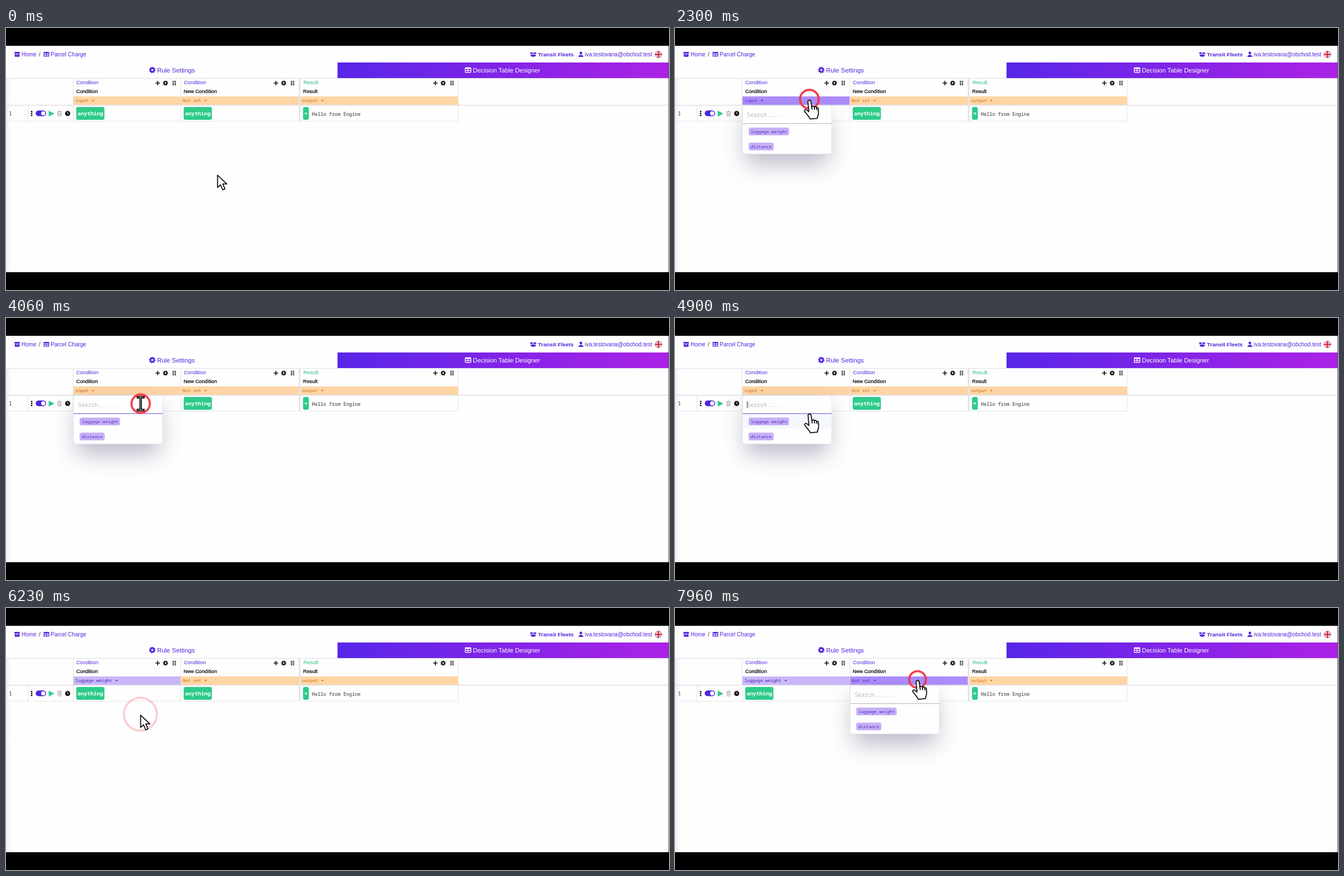
An HTML page for the animation above (8000 ms loop, 1189 by 471 pixels).

```html
<!DOCTYPE html>
<html lang="en">
<head>
<meta charset="utf-8">
<title>Decision table</title>
<style>
  html, body { margin: 0; width: 100%; height: 100%; overflow: hidden; background: #fefefe; }
  svg { display: block; width: 1189px; height: 471px; }
  text { font-family: "Liberation Sans", Arial, sans-serif; white-space: pre; }
  .mono { font-family: "Noto Sans Mono", "DejaVu Sans Mono", monospace; }
</style>
</head>
<body>
<svg id="stage" viewBox="0 0 1189 471" xmlns="http://www.w3.org/2000/svg">
  <defs>
    <linearGradient id="tab"><stop stop-color="#5726e8"/><stop offset="1" stop-color="#ac22e6"/></linearGradient>
    <linearGradient id="edge"><stop stop-color="#eeeef3"/><stop offset="1" stop-color="#fefefe"/></linearGradient>
    <filter id="blur" x="-100%" y="-100%" width="300%" height="300%"><feGaussianBlur stdDeviation="21"/></filter>
    <clipPath id="round"><circle r="6.5"/></clipPath>
  </defs>
  <g id="page"></g>
  <g id="bars"></g>
  <g id="menu"></g>
  <circle id="ring" fill="none" stroke="#f53340" stroke-width="3.8"/>
  <g id="cursor"></g>
</svg>
<script>
const LOOP = 8000;
const PURPLE = '#5325dd', GREEN = '#2dcb8a', INK = '#111';
const $ = id => document.getElementById(id);

// Drawing helpers
const rect = (x, y, w, h, fill, r = 0, more = '') =>
  `<rect x="${x}" y="${y}" width="${w}" height="${h}" rx="${r}" fill="${fill}" ${more}/>`;
const text = (x, y, size, fill, str, more = '') =>
  `<text x="${x}" y="${y}" font-size="${size}" fill="${fill}" ${more}>${str}</text>`;
const mono = (x, y, size, fill, str, more = '') => text(x, y, size, fill, str, 'class="mono" ' + more);
const path = (d, fill, more = '') => `<path d="${d}" fill="${fill}" ${more}/>`;
const dot = (x, y, r, fill, more = '') => `<circle cx="${x}" cy="${y}" r="${r}" fill="${fill}" ${more}/>`;
const at = (x, y, body) => `<g transform="translate(${x} ${y})">${body}</g>`;

const gear = (x, y, r, c) => at(x, y,
  dot(0, 0, r * .56, 'none', `stroke="${c}" stroke-width="${r * .48}"`) +
  dot(0, 0, r * .86, 'none', `stroke="${c}" stroke-width="${r * .3}" pathLength="16" stroke-dasharray="1.1 .9"`));

const tableIcon = (x, y, w, h, c, gap) => {
  const cw = w / 2 - 1.7, ch = (h - 5) / 2;
  let s = rect(x, y, w, h, c, 1.2);
  for (const i of [0, 1]) for (const j of [0, 1])
    s += rect(x + 1.2 + i * (cw + 1), y + 2.6 + j * (ch + 1.2), cw, ch, gap);
  return s;
};

const columnTools = x => {
  let s = path(`M${x - 4} 99H${x + 4}M${x} 95V103`, 'none', `stroke="${INK}" stroke-width="1.6"`) + gear(x + 14, 99, 4.5, INK);
  for (const i of [0, 1]) for (const j of [0, 1, 2])
    s += rect(x + 26.8 + i * 3.6, 95 + j * 3, 2.4, 2.1, '#222', .6);
  return s;
};

const badge = (x, w, str) => rect(x, 142, w, 23, GREEN, 3) +
  mono(x + w / 2, 156.8, 9.6, '#fff', str, 'font-weight="700" text-anchor="middle"');

const flag = at(1170, 47.5, `<g clip-path="url(#round)">` +
  dot(0, 0, 7, '#2b4390') +
  path('M-7-7L7 7M-7 7L7-7', 'none', 'stroke="#fff" stroke-width="2.8"') +
  path('M-7-7L7 7M-7 7L7-7', 'none', 'stroke="#d8283c" stroke-width="1"') +
  path('M0-7V7M-7 0H7', 'none', 'stroke="#fff" stroke-width="4.4"') +
  path('M0-7V7M-7 0H7', 'none', 'stroke="#d8283c" stroke-width="2.6"') + '</g>');

const boxIcon = at(945.5, 47.5,
  path('M-4.5-4L0-3L4.5-4L6-1.6L1.8-.4L0-2.4L-1.8-.4L-6-1.6Z', PURPLE) +
  path('M-4.5 0L-1.6 .8L0-1L1.6 .8L4.5 0V3L0 4.5L-4.5 3Z', PURPLE));

function drawPage() {
  const line = '#e4e5ea';
  let s = rect(0, 0, 1189, 471, '#fefefe') + rect(0, 91, 9, 348, 'url(#edge)');

  // Top bar
  s += rect(15, 43, 10, 2.8, PURPLE, .6) + rect(15.7, 46.4, 8.6, 5.4, PURPLE, .8) + rect(18.4, 47.4, 3.2, 1, '#fff');
  s += text(28, 50.6, 10, PURPLE, 'Home') + text(59, 50.6, 10, '#333', '/');
  s += tableIcon(67.5, 43, 10, 8.6, PURPLE, '#fff') + text(80, 50.6, 10, PURPLE, 'Parcel Charge');
  s += boxIcon + text(954, 51.2, 9.95, PURPLE, 'Transit Fleets', 'font-weight="700"');
  s += dot(1031, 45, 2.4, PURPLE) + path('M1026.6 52C1026.6 47 1035.4 47 1035.4 52Z', PURPLE);
  s += text(1038, 51.2, 10, PURPLE, 'iva.testovana@obchod.test') + flag;

  // Tabs
  s += rect(0, 89.8, 1188, 1.4, line) + rect(594.5, 62, 593.8, 28, 'url(#tab)');
  s += gear(262.3, 75.5, 5.8, PURPLE) + text(271, 79.8, 11.4, PURPLE, 'Rule Settings');
  s += tableIcon(823, 70.8, 11.3, 9.6, '#fff', '#8124e8') + text(837.3, 79.8, 11.2, '#fff', 'Decision Table Designer');

  // Grid
  s += rect(0, 138, 1188, 1.8, line) + rect(0, 167, 811, 1, line) + rect(39, 139, 1, 28, line);
  s += rect(120, 91, 1, 77, line) + rect(313, 91, 1, 77, line) + rect(525, 91, 3, 77, line) + rect(810.5, 91, 1, 77, line);

  // Headings
  const heads = [[126, 126, 'Condition', 'Condition', PURPLE, 272],
                 [319, 318.5, 'Condition', 'New Condition', PURPLE, 484],
                 [533.5, 532.8, 'Result', 'Result', '#2bbd7c', 770]];
  for (const [x, x2, kind, name, color, tools] of heads)
    s += text(x, 101.2, 9.4, color, kind) +
         text(x2, 116.8, 9.2, '#000', name, 'stroke="#000" stroke-width=".22"') + columnTools(tools);

  // Row
  s += rect(40, 140, 770.5, 27, '#f3f6fb', 0, 'id="rowHover"');
  s += mono(5.3, 157.4, 9, '#222', '1');
  for (const y of [150.2, 153.7, 157.2]) s += dot(46, y, 1.35, INK);
  s += rect(53.3, 148.2, 18.6, 10.4, '#4c26dc', 5.2) + dot(66.7, 153.4, 3.7, '#fff');
  s += path('M77 149.2L86 153.9L77 158.6Z', GREEN, `stroke="${GREEN}" stroke-linejoin="round" stroke-width=".8"`);
  s += path('M92 150.8H100M94.7 150.4V149.4H97.3V150.4M93 151L93.4 158.2H98.6L99 151M95 152.8V156.6M97 152.8V156.6', 'none', 'stroke="#999" stroke-width=".9"');
  s += dot(110.6, 153.7, 4.6, INK) + path('M110.6 150.8V153.9L112.6 155.2', 'none', 'stroke="#fff" stroke-width="1"');
  s += badge(126, 50.5, 'anything') + badge(318.7, 50.5, 'anything') + badge(532.7, 10.3, '=');
  s += mono(548.6, 157.8, 8.55, '#333', 'Hello from Engine');

  // Letterbox
  s += rect(0, 0, 1189, 32, '#000') + rect(0, 439, 1189, 32, '#000') + rect(1188.3, 32, .7, 407, '#222');
  $('page').innerHTML = s;
}

function drawMenu() {
  const chip = (y, w, str) => rect(132, y, w, 14, '#c6b0f6', 3.5) + mono(135.7, y + 9.6, 7.83, '#5428c4', str);
  $('menu').innerHTML =
    rect(127, 160, 148, 84, '#38325f', 4, 'filter="url(#blur)" opacity=".34"') +
    rect(121, 139.5, 160, 87, '#fefefe', 4, 'stroke="#dcdce4" stroke-width=".6"') +
    rect(121, 172, 160, 27, '#f4f7fc', 0, 'id="itemHover"') +
    mono(129, 159.6, 10, '#b3b9c4', 'Search......') +
    rect(129, 150, 1, 12, '#333', 0, 'id="caret"') +
    rect(121, 171, 160, 1.5, '#c8c8cc', 0, 'id="underline"') +
    chip(179, 72.5, 'luggage.weight') + chip(206, 45, 'distance');
}

// Cursor shapes; the hot spot sits at 0,0
const outline = `stroke="#111" stroke-width="1.8" stroke-linejoin="round" stroke-linecap="round"`;
const SHAPES = {
  arrow: path('M.4 1.6V23.6L5.6 19L9.6 28L13.6 26.2L9.8 17.4H17Z', '#fff', outline),
  hand: path('M-2.6 5A2.7 2.7 0 0 1 2.8 4L4.2 13.4C5.4 11.6 8.2 12 8.7 14C10 12.6 12.4 13.2 12.9 15.2C14.4 14.2 16 15.4 16.1 18L16.3 24.6C16.3 28.6 14.4 30 14.2 34.4L1.2 35.6C.6 32.4-2.2 30.6-3.8 28L-8.2 22.4C-9.8 19.8-7 17.4-4.6 19.4L-1 22.6Z', '#fff', outline) +
    path('M4.2 13.4L4.8 18M8.7 14L9.2 18.4M12.9 15.2L13.2 19', 'none', outline),
  beam: path('M-5-11.5H5M-5 11.5H5M0-11V11', 'none', 'stroke="#111" stroke-width="4.4" stroke-linecap="square"') +
    path('M-5-11.5H5M-5 11.5H5M0-11V11', 'none', 'stroke="#aaa" stroke-width="1"')
};

// Timeline
const MOVES = [[1000, 1465, 241, 128], [3130, 3420, 241.5, 154], [4760, 5060, 241, 191], [6430, 7190, 435, 128.5]];
const POINTERS = [[0, 'arrow'], [1180, 'hand'], [3100, 'beam'], [4840, 'hand'], [5230, 'arrow'], [7110, 'hand']];
const CLICKS = [1660, 3430, 5100, 7390], CLICK_TIME = 1240;
const SELECT = 5230;

// Bar looks: background, label colour
const IDLE = [[255, 213, 165], [201, 106, 8]];
const HOVER = [[173, 141, 251], [84, 40, 196]];
const CHOSEN = [[202, 183, 248], [74, 34, 180]];
const BARS = [
  { x: 121, w: 192, tx: 124.5, label: t => t < SELECT ? 'input' : 'luggage.weight', keys: [[1160, HOVER], [3085, IDLE], [SELECT, CHOSEN]] },
  { x: 314, w: 211, tx: 317, label: () => 'Not set', keys: [[7151, HOVER]] },
  { x: 528, w: 283, tx: 531, label: () => 'output', keys: [] }
];

const clamp = v => Math.max(0, Math.min(1, v));
const between = (t, a, b) => t >= a && t < b;
const sine = p => .5 - .5 * Math.cos(Math.PI * p);
const smooth = p => p * p * (3 - 2 * p);
const rgb = c => `rgb(${c.map(Math.round)})`;
const show = (id, on) => $(id).setAttribute('visibility', on ? 'inherit' : 'hidden');

function look(keys, t) {
  return keys.reduce((now, [start, next]) => {
    const k = smooth(clamp((t - start) / 150));
    return now.map((c, i) => c.map((v, j) => v + (next[i][j] - v) * k));
  }, IDLE);
}

function place(t) {
  return MOVES.reduce(([x, y], [a, b, nx, ny]) => {
    const k = sine(clamp((t - a) / (b - a)));
    return [x + (nx - x) * k, y + (ny - y) * k];
  }, [379, 263]);
}

function drawBars(t) {
  $('bars').innerHTML = BARS.map(b => {
    const [back, ink] = look(b.keys, t).map(rgb), label = b.label(t);
    const cx = b.tx + label.length * 4.7 + 8.2;
    return rect(b.x, 123, b.w, 15, back) + mono(b.tx, 133.2, 7.83, ink, label) +
      path(`M${cx - 2.3} 129.6h4.6l-2.3 2.5Z`, ink);
  }).join('');
}

let pointer;
function render(t) {
  drawBars(t);
  show('rowHover', between(t, 1080, 1180) || between(t, 7030, 7130));

  const first = between(t, 1790, SELECT), second = t >= 7520, focused = between(t, 3530, SELECT);
  $('menu').setAttribute('visibility', first || second ? 'visible' : 'hidden');
  $('menu').setAttribute('transform', `translate(${second ? 193 : 0} 0)`);
  $('underline').setAttribute('fill', focused ? '#a080d8' : '#c8c8cc');
  show('caret', focused && (t - 3530) % 1000 < 500);
  show('itemHover', between(t, 4820, SELECT));

  const [x, y] = place(t);
  const click = CLICKS.find(c => between(t, c, c + CLICK_TIME));
  show('ring', click !== undefined);
  if (click !== undefined) {
    const p = (t - click) / CLICK_TIME, [cx, cy] = place(click);
    $('ring').setAttribute('cx', cx);
    $('ring').setAttribute('cy', cy);
    $('ring').setAttribute('r', 32.4 * p);
    $('ring').setAttribute('opacity', Math.min(.92, 2.7 * (1 - p)));
  }

  const shape = POINTERS.filter(([start]) => t >= start).pop()[1];
  if (shape !== pointer) $('cursor').innerHTML = SHAPES[pointer = shape];
  $('cursor').setAttribute('transform', `translate(${x} ${y})`);
}

drawPage();
drawMenu();
const began = performance.now();
function tick() {
  render((performance.now() - began) % LOOP);
  requestAnimationFrame(tick);
}
tick();
</script>
</body>
</html>
```
